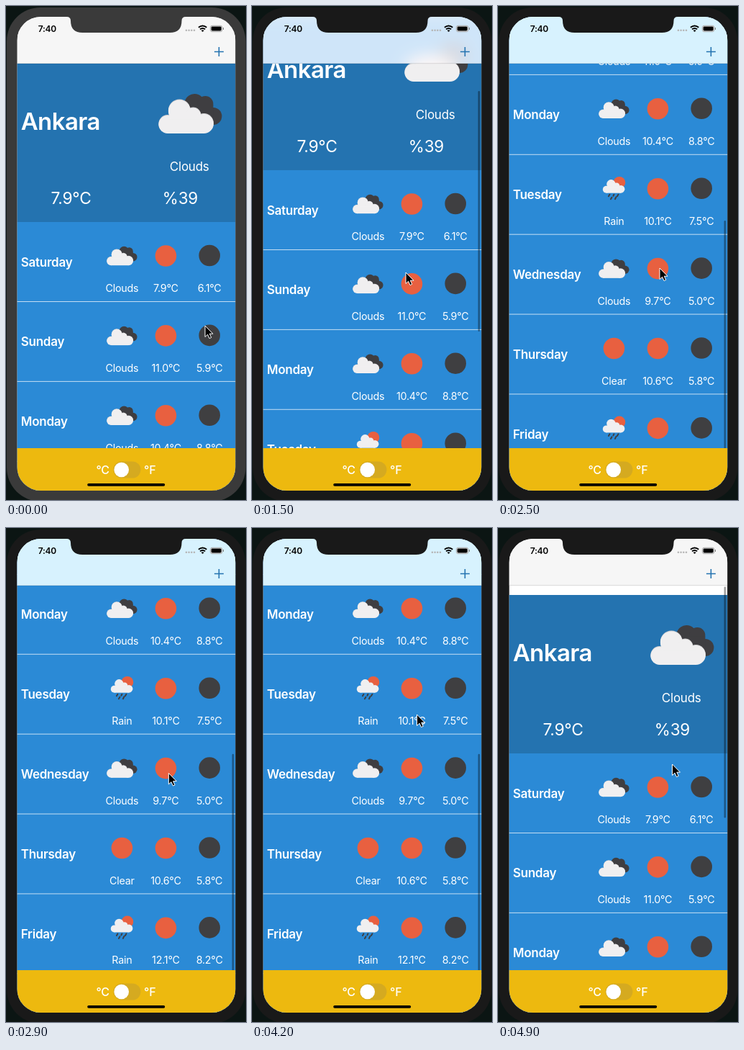
These frames come from a looping animation (334 px wide and 686 px high, 5 s). An HTML page:

```html
<!DOCTYPE html>
<html lang="en">
<head>
<meta charset="utf-8">
<title>Weather</title>
<style>
html, body { margin: 0; width: 100%; height: 100%; overflow: hidden; background: #0b1513; }
svg { display: block; width: 334px; height: 686px; font-family: Inter, "Liberation Sans", sans-serif; letter-spacing: -.015em; }
.mid { text-anchor: middle; }
</style>
</head>
<body>
<svg viewBox="0 0 334 686">
  <defs>
    <clipPath id="screen"><rect x="15" y="15" width="304" height="658" rx="33"/></clipPath>
    <clipPath id="nav"><rect x="15" y="15" width="304" height="65"/></clipPath>
    <filter id="blur" filterUnits="userSpaceOnUse" x="-30" y="-40" width="400" height="190">
      <feGaussianBlur stdDeviation="11"/>
    </filter>
    <g id="front">
      <circle cx="-31.500" cy="15" r="12.500"/><circle cx="-15" cy="-3.500" r="15.500"/>
      <circle cx="4" cy="3" r="11"/><circle cx="19" cy="14" r="13.500"/>
      <rect x="-31.500" y="8" width="50.500" height="19.500"/>
    </g>
    <g id="clouds">
      <g fill="#3f3e41">
        <circle cx="6" cy="-13.500" r="14"/><circle cx="21" cy="-13.500" r="11"/>
        <circle cx="32" cy="3.500" r="12"/><rect x="0" y="-12" width="32" height="27.500"/>
      </g>
      <use href="#front" fill="#cfced0" y="-1"/>
      <use href="#front" fill="#f0eff0"/>
    </g>
    <g id="rain">
      <circle cx="7.500" cy="-8.500" r="8.300" fill="#e86040"/>
      <use href="#front" fill="#f0eff0" transform="translate(2 -5) scale(.4)"/>
      <path d="M-6 8l-1.500 2.500M0 8l-1 2M6 8l-1.500 2.500M-3 12l-1.500 2.500M3 11.500l-1.500 3" stroke="#3f3e41" stroke-width="2" stroke-linecap="round"/>
    </g>
    <circle id="sun" r="14.800" fill="#e86040"/>
    <circle id="moon" r="14.800" fill="#3f3f41"/>
  </defs>

  <rect id="bezel" x="1" y="2" width="332.500" height="686" rx="47"/>
  <g clip-path="url(#screen)" transform="translate(.4 0)">
    <rect x="15" y="15" width="304" height="658" fill="#fff"/>
    <g id="list" fill="#fff"></g>
    <rect id="thumb" x="314.200" width="2.500" rx="1.250" fill="#000" opacity=".38"/>

    <g clip-path="url(#nav)">
      <rect x="15" y="15" width="304" height="65" fill="#f6f6f6"/>
      <g id="tint" filter="url(#blur)">
        <g id="glow">
          <rect x="-60" y="80" width="460" height="220" fill="#cfe5f9"/>
          <rect x="-60" y="300" width="460" height="900" fill="#d7f2fe"/>
          <ellipse cx="280" cy="142" rx="20" ry="20" fill="#d6d9e0"/>
          <ellipse cx="248" cy="159" rx="36" ry="18" fill="#fff8f6"/>
        </g>
      </g>
    </g>
    <path d="M15 79.700H319" stroke="#000" stroke-opacity=".22" stroke-width=".6"/>
    <path d="M289.500 63.500h13M296 57v13" stroke="#2473b0" stroke-width="1.600"/>

    <rect x="15" y="614" width="304" height="60" fill="#edb90f"/>
    <g fill="#fff" font-size="16" font-weight="500" class="mid">
      <text x="134.200" y="650">°C</text><text x="199.800" y="650">°F</text>
    </g>
    <rect x="149" y="632.500" width="38" height="23" rx="11.500" fill="#d5aa20"/>
    <circle cx="160.300" cy="644" r="10.300" fill="#fff"/>
    <rect x="112.800" y="663" width="108" height="3.700" rx="1.850"/>

    <text x="57" y="36" class="mid" font-size="12" font-weight="600">7:40</text>
    <path d="M250.500 33.800h13" stroke="#b5b5b5" stroke-width="2.600" stroke-linecap="round" stroke-dasharray="0 3.700"/>
    <g fill="none" stroke="#000" stroke-width="1.900">
      <path d="M267.500 29.800q5.700-4.600 11.400 0M269.600 32.300q3.600-2.800 7.200 0"/>
    </g>
    <path d="M271.200 34l2 2 2-2q-2-1.500-4 0z"/>
    <rect x="284" y="27.300" width="16.500" height="8.400" rx="2.500" fill="#f6f6f6" stroke="#888" stroke-width=".7"/>
    <rect x="285.200" y="28.500" width="14.100" height="6" rx="1.400"/>
    <path d="M302 30v3" stroke="#777"/>
  </g>
  <path id="notch" d="M84.500 14V15q5.500 0 5.500 5.500q0 16.500 16.500 16.500H228q16.500 0 16.500-16.500q0-5.500 5.500-5.500V14z"/>
  <path id="cursor" d="M0 0V15.500L3.600 12.200L6 17.600L8.700 16.400L6.300 11.200H11z" fill="#000" stroke="#fff" stroke-width="1"/>
</svg>
<script>
const $ = id => document.getElementById(id);
const ROW = 110.9, LOOP = 5000, STEP = 100;

const days = [
  ["Saturday", "Clouds", "7.9", "6.1"],
  ["Sunday", "Clouds", "11.0", "5.9"],
  ["Monday", "Clouds", "10.4", "8.8"],
  ["Tuesday", "Rain", "10.1", "7.5"],
  ["Wednesday", "Clouds", "9.7", "5.0"],
  ["Thursday", "Clear", "10.6", "5.8"],
  ["Friday", "Rain", "12.1", "8.2"]
];
const icons = {
  Clouds: '<use href="#clouds" transform="translate(161 47) scale(.48)"/>',
  Rain: '<use href="#rain" x="161" y="47"/>',
  Clear: '<use href="#sun" x="161" y="47"/>'
};
const label = (x, y, size, text) =>
  `<text class="mid" x="${x}" y="${y}" font-size="${size}">${text}</text>`;

const row = ([day, sky, high, low], i) => `
  <g transform="translate(0 ${300 + i * ROW})">
    <text x="20.300" y="61.500" font-size="17" font-weight="600">${day}</text>
    ${icons[sky]}
    <use href="#sun" x="222" y="47"/><use href="#moon" x="282.800" y="46.500"/>
    ${label(161, 97, 14.3, sky)}${label(222, 97, 14.3, high + "°C")}${label(282.8, 97, 14.3, low + "°C")}
    <rect x="15" y="${ROW - 0.9}" width="304" height=".9" opacity=".8"/>
  </g>`;

$("list").innerHTML = `
  <rect x="15" y="80" width="304" height="220" fill="#2473b0"/>
  <rect x="15" y="300" width="304" height="900" fill="#2b8ad6"/>
  <text x="20.300" y="171.500" font-size="33" font-weight="600" letter-spacing="-.6">Ankara</text>
  <use href="#clouds" x="256" y="149.500"/>
  ${label(254.8, 228.5, 17, "Clouds")}${label(90.2, 275, 22.8, "7.9°C")}${label(242, 275, 22.5, "%39")}
  ${days.map(row).join("")}`;

// Keys are [time, ...values]
const scrollKeys = [[0, 0], [1000, 0], [1100, 8], [1300, 40], [1500, 72], [1700, 90], [1900, 97],
  [2100, 97], [2200, 145], [2300, 250], [2400, 355], [2500, 426], [2600, 450], [2700, 457],
  [4300, 457], [4400, 430], [4500, 350], [4600, 225], [4700, 100], [4800, 15], [4900, -13]];
const cursorKeys = [[0, 277, 444], [300, 270, 440], [800, 213, 424], [1000, 211, 424], [1100, 211, 416],
  [1500, 214, 370], [1800, 219, 400], [2100, 221.5, 423], [2200, 222, 405], [2500, 225, 364],
  [3400, 228, 311], [4200, 229.5, 259], [4300, 230, 259], [4700, 240, 318], [4900, 242.5, 328]];

function at(keys, t) {
  const n = keys.findIndex(k => k[0] > t);
  if (n < 0) return keys[keys.length - 1].slice(1);
  const a = keys[n - 1], b = keys[n], p = (t - a[0]) / (b[0] - a[0]);
  return a.slice(1).map((v, i) => v + (b[i + 1] - v) * p);
}

function draw(now) {
  const t = Math.floor(now % LOOP / STEP) * STEP;
  const [s] = at(scrollKeys, t), [x, y] = at(cursorKeys, t);
  const move = `translate(0 ${-s})`, over = Math.max(0, -s);
  $("list").setAttribute("transform", move);
  $("glow").setAttribute("transform", move);
  $("tint").setAttribute("opacity", Math.min(1, Math.max(0, s / 18)));
  $("thumb").setAttribute("y", 81.5 + Math.max(0, s) * 0.508);
  $("thumb").setAttribute("height", 334 - over);
  $("thumb").style.display = t < 1000 ? "none" : "";
  $("cursor").setAttribute("transform", `translate(${x} ${y})`);
  const shell = t < 900 ? "#3a3a3a" : "#191919";
  $("bezel").setAttribute("fill", shell);
  $("notch").setAttribute("fill", shell);
}

const start = performance.now();
function tick() {
  draw(performance.now() - start);
  requestAnimationFrame(tick);
}
tick();
</script>
</body>
</html>
```
